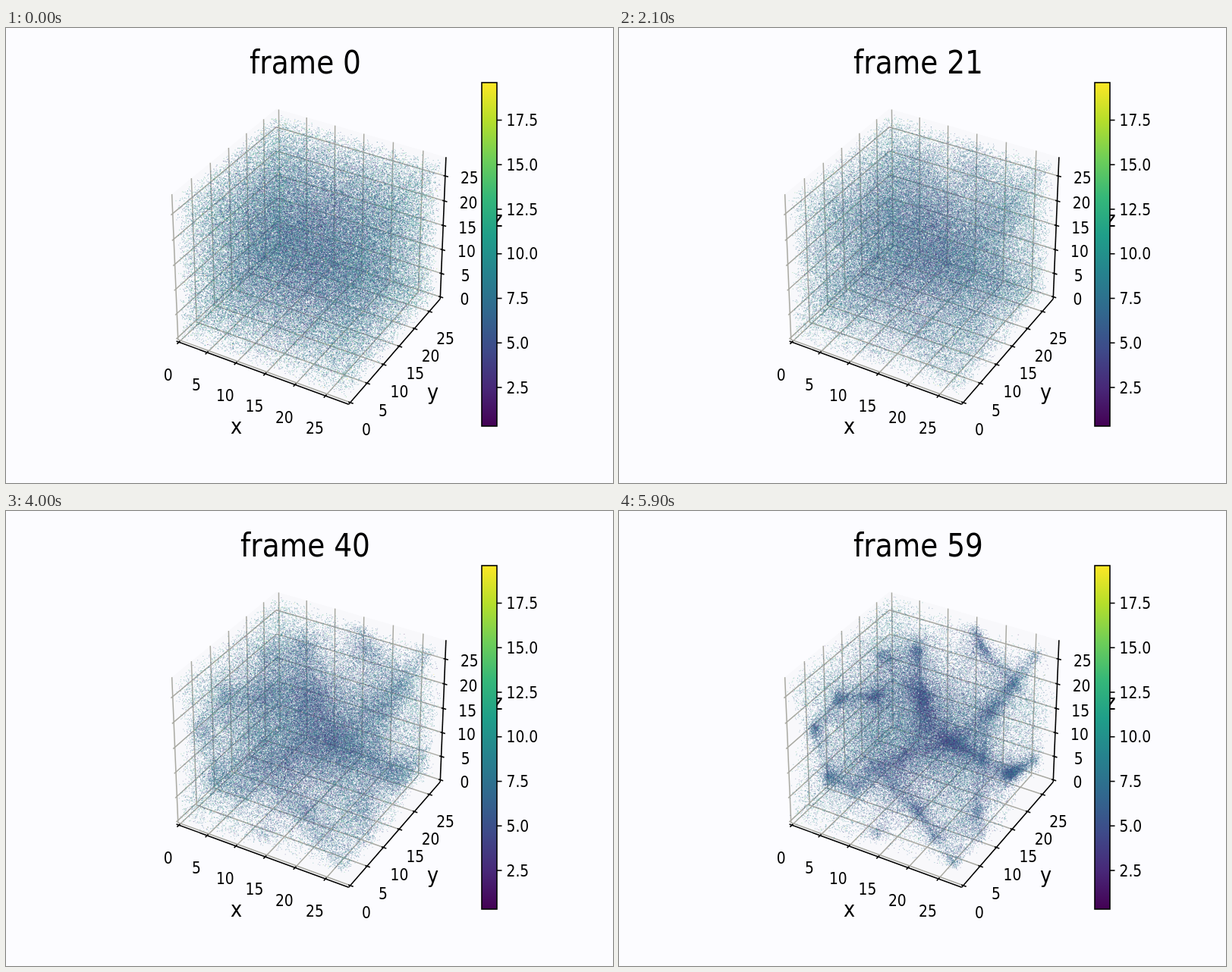
An HTML page with a canvas that plays this animation: 800 by 600 pixels, repeating every 6000 ms.

```html
<!DOCTYPE html>
<html lang="en">
<head>
<meta charset="utf-8">
<title>Particle box</title>
<style>
html, body { margin: 0; width: 100%; height: 100%; overflow: hidden; background: #fcfcff; }
svg { position: absolute; left: 0; top: 0; }
canvas { position: absolute; left: 210px; top: 100px; }
text { font-family: "DejaVu Sans", sans-serif; }
</style>
</head>
<body>
<svg id="plot" width="800" height="600" viewBox="0 0 800 600"></svg>
<canvas id="cloud" width="380" height="410"></canvas>
<script>
const STEP = 100, STEPS = 60;
const LEFT = 210, TOP = 100, W = 380, H = 410;
const ASPECT = 0.8824;              // the figure is narrowed horizontally
const LO = -0.45, HI = 28.75;       // axis limits
const HALF = [0.5953, 0.5953, 0.4464];
const U = [0.866, 0.5, 0], V = [-0.25, 0.433, 0.866], N = [0.433, -0.75, 0.5];
const DIST = 10, SX = 2185, SY = 2450, CX = 401.6, CY = 292;
const VIRIDIS = ['440154', '482878', '3e4a89', '31688e', '26828e',
                 '1f9e89', '35b779', '6ece58', 'b5de2b', 'fde725'];

const svg = document.getElementById('plot');
const dot = (a, b) => a[0] * b[0] + a[1] * b[1] + a[2] * b[2];

// ---------- camera ----------
function project(d) {
  const depth = DIST - dot(N, d);
  return [CX + SX * dot(U, d) / depth, CY - SY * dot(V, d) / depth];
}
const at = (...p) => project(p.map((c, i) => ((c - LO) / (HI - LO) * 2 - 1) * HALF[i]));

// Point inside the box on the view ray through (x, y); f runs from near to far
function unproject(x, y, f) {
  const a = (x - CX) / SX, b = (CY - y) / SY;
  const dir = U.map((u, i) => a * u + b * V[i] - N[i]);
  let near = 0, far = 99;
  dir.forEach((s, i) => {
    const p = (-HALF[i] - DIST * N[i]) / s, q = (HALF[i] - DIST * N[i]) / s;
    near = Math.max(near, Math.min(p, q));
    far = Math.min(far, Math.max(p, q));
  });
  const t = near + (far - near) * f;
  return dir.map((s, i) => s * t + DIST * N[i]);
}

// ---------- static figure ----------
function add(tag, attrs, parent = svg) {
  const el = document.createElementNS('http://www.w3.org/2000/svg', tag);
  for (const k in attrs) el.setAttribute(k, attrs[k]);
  return parent.appendChild(el);
}
function line(points, color, width) {
  add('polyline', { points: points.map(p => p.map(c => c.toFixed(2))).join(' '),
    fill: 'none', stroke: color, 'stroke-width': width });
}
function label(x, y, str, size, anchor = 'middle') {
  const el = add('text', { transform: `translate(${x} ${y}) scale(${ASPECT} 1)`,
    'font-size': size, 'text-anchor': anchor });
  el.textContent = str;
  return el;
}
function pane(...corners) {
  add('polygon', { points: corners.map(c => at(...c)).join(' '), fill: '#f8f8fb' });
}

pane([LO, LO, LO], [HI, LO, LO], [HI, HI, LO], [LO, HI, LO]);
pane([LO, LO, LO], [LO, HI, LO], [LO, HI, HI], [LO, LO, HI]);
pane([LO, HI, LO], [HI, HI, LO], [HI, HI, HI], [LO, HI, HI]);

const ticks = Array.from({ length: 6 }, (_, i) => 5 * i);
const GRID = '#a9a9a2', INK = '#000';
for (const v of ticks) {
  line([at(v, LO, LO), at(v, HI, LO), at(v, HI, HI)], GRID, 1.5);
  line([at(HI, v, LO), at(LO, v, LO), at(LO, v, HI)], GRID, 1.5);
  line([at(LO, LO, v), at(LO, HI, v), at(HI, HI, v)], GRID, 1.5);
}
line([at(LO, LO, LO), at(HI, LO, LO)], INK, 1.6);
line([at(HI, LO, LO), at(HI, HI, LO)], INK, 1.6);
line([at(HI, HI, LO), at(HI, HI, HI)], INK, 1.6);

const IN = 0.3, OUT = 0.5, SMALL = 21.2;
function tickLabel([x, y], dx, dy, v) {
  label(x + dx, y + dy + SMALL * 0.364, v, SMALL);
}
for (const v of ticks) {
  line([at(v, LO + IN, LO), at(v, LO - OUT, LO)], INK, 1.6);
  line([at(HI - IN, v, LO), at(HI + OUT, v, LO)], INK, 1.6);
  line([at(HI - IN, HI, v), at(HI + OUT, HI, v)], INK, 1.6);
  tickLabel(at(v, LO, LO), -14.2, 42.7, v);
  tickLabel(at(HI, v, LO), 21.2, 35.7, v);
  tickLabel(at(HI, HI, v), 32, 2.5, v);
}
label(303.5, 535, 'x', 29);
label(562.5, 490, 'y', 29);
label(648, 262, 'z', 29);

// Colour bar
const grad = add('linearGradient', { id: 'bar', x1: 0, y1: 1, x2: 0, y2: 0 }, add('defs', {}));
VIRIDIS.forEach((c, i) => add('stop', { offset: i / 9, 'stop-color': '#' + c }, grad));
add('rect', { x: 627, y: 72, width: 20, height: 453, fill: 'url(#bar)',
  stroke: INK, 'stroke-width': 1.6 });
for (let i = 0; i < 7; i++) {
  const y = 474 - 58.75 * i;
  line([[647, y], [653.5, y]], INK, 1.6);
  label(659.5, y + SMALL * 0.364, (2.5 * (i + 1)).toFixed(1), SMALL, 'start');
}
const title = label(394.5, 60, '', 42.5);

// ---------- particles ----------
let seed = 20;
function rnd() {
  seed = (seed + 0x6D2B79F5) | 0;
  let t = Math.imul(seed ^ seed >>> 15, 1 | seed);
  t = t + Math.imul(t ^ t >>> 7, 61 | t) ^ t;
  return ((t ^ t >>> 14) >>> 0) / 4294967296;
}
const gauss = () => 2 * (rnd() + rnd() + rnd() - 1.5);

// Filaments as seen on screen; matter gathers along them and most at their bends
const strands = [
  [[349, 191], [393, 184], [400, 240]],
  [[470, 155], [480, 182], [520, 225], [490, 263]],
  [[310, 365], [277, 350], [258, 286], [290, 248], [338, 245], [383, 230], [405, 243]],
  [[362, 365], [395, 396], [418, 430], [472, 398], [518, 346], [552, 326]],
  [[335, 335], [372, 325], [440, 305], [402, 282]],
  [[440, 305], [480, 328], [518, 346]],
  [[440, 465], [480, 435]],
  [[338, 428]],
  [[550, 187]]
];

function segment(a, b, reach, weight) {
  const e = b.map((c, i) => c - a[i]);
  return { a, e, len2: dot(e, e), r2: reach * reach, weight };
}
const web = [];
for (const strand of strands) {
  let last;
  for (const [x, y] of strand) {
    const p = unproject(x, y, 0.5 + 0.15 * Math.sin(x * 0.05));
    const reach = 0.145 - 0.0004 * Math.hypot(x - 430, y - 300);
    web.push(segment(p, p, reach, 1.8));
    if (last) web.push(segment(last, p, 0.085, 1.3));
    last = p;
  }
}

const COUNT = 110000, FIELDS = 8;   // position, shift, value, pull
const parts = new Float32Array(COUNT * FIELDS);
for (let i = 0; i < COUNT; i++) {
  const q = HALF.map(h => (rnd() * 2 - 1) * h * 0.97);
  let sum = 0, sx = 0, sy = 0, sz = 0;
  for (const { a, e, len2, r2, weight } of web) {
    const x = a[0] - q[0], y = a[1] - q[1], z = a[2] - q[2];
    let k = len2 ? -(x * e[0] + y * e[1] + z * e[2]) / len2 : 0;
    k = k < 0 ? 0 : k > 1 ? 1 : k;
    const dx = x + k * e[0], dy = y + k * e[1], dz = z + k * e[2];
    const d2 = dx * dx + dy * dy + dz * dz;
    if (d2 > 9 * r2) continue;
    const w = weight * Math.exp(-d2 / (2 * r2));
    sum += w; sx += w * dx; sy += w * dy; sz += w * dz;
  }
  const pull = Math.tanh(sum);
  const gain = sum ? pull * (0.65 + 0.35 * rnd()) / sum : 0;
  const radius = Math.sqrt(dot(q, q)) / 0.0408;
  const value = 4 + 0.2 * radius + 2.6 * gauss() + (rnd() < 0.12 ? 8 * rnd() : 0);
  const shift = [sx, sy, sz].map(s => s * gain + gauss() * 0.014);
  parts.set([...q, ...shift, value, pull], i * FIELDS);
}

const rgb = VIRIDIS.map(c => [0, 2, 4].map(i => parseInt(c.slice(i, i + 2), 16)));
const SHADES = 128;
const shades = Array.from({ length: SHADES }, (_, i) => {
  const p = i / (SHADES - 1) * 9, k = Math.min(8, Math.floor(p));
  return rgb[k].map((c, j) => c + (rgb[k + 1][j] - c) * (p - k));
});

const ctx = document.getElementById('cloud').getContext('2d');
const image = ctx.createImageData(W, H);
const acc = new Float32Array(W * H * 4);

function blend(px, py, c, alpha) {
  const k = (py * W + px) * 4, keep = 1 - alpha;
  acc[k] = acc[k] * keep + c[0] * alpha;
  acc[k + 1] = acc[k + 1] * keep + c[1] * alpha;
  acc[k + 2] = acc[k + 2] * keep + c[2] * alpha;
  acc[k + 3] = acc[k + 3] * keep + alpha;
}

function drawCloud(n) {
  const growth = (n / (STEPS - 1)) ** 1.5, alpha = n ? 0.4 : 0.45;
  acc.fill(0);
  for (let o = 0; o < parts.length; o += FIELDS) {
    const x = parts[o] + growth * parts[o + 3];
    const y = parts[o + 1] + growth * parts[o + 4];
    const z = parts[o + 2] + growth * parts[o + 5];
    const depth = DIST - (N[0] * x + N[1] * y + N[2] * z);
    const u = CX - LEFT - 0.5 + SX * (U[0] * x + U[1] * y) / depth;
    const v = CY - TOP - 0.5 - SY * (V[0] * x + V[1] * y + V[2] * z) / depth;
    const px = Math.floor(u), py = Math.floor(v), fx = u - px, fy = v - py;
    if (px < 0 || py < 0 || px >= W - 1 || py >= H - 1) continue;
    const value = parts[o + 6] * (1 - 0.22 * growth * parts[o + 7]);
    const shade = Math.round((value - 0.33) / 19.27 * SHADES);
    const c = shades[Math.max(0, Math.min(SHADES - 1, shade))];
    blend(px, py, c, alpha * (1 - fx) * (1 - fy));
    blend(px + 1, py, c, alpha * fx * (1 - fy));
    blend(px, py + 1, c, alpha * (1 - fx) * fy);
    blend(px + 1, py + 1, c, alpha * fx * fy);
  }
  const out = image.data;
  for (let k = 0; k < acc.length; k += 4) {
    const a = acc[k + 3];
    out[k + 3] = a * 255;
    if (!a) continue;
    out[k] = acc[k] / a;
    out[k + 1] = acc[k + 1] / a;
    out[k + 2] = acc[k + 2] / a;
  }
  ctx.putImageData(image, 0, 0);
}

// ---------- loop ----------
let shown = -1;
function render(ms) {
  const n = Math.floor(ms / STEP) % STEPS;
  if (n === shown) return;
  shown = n;
  title.textContent = 'frame ' + n;
  drawCloud(n);
}
render(0);
const start = performance.now();
function tick() {
  render(performance.now() - start);
  requestAnimationFrame(tick);
}
requestAnimationFrame(tick);
</script>
</body>
</html>
```
